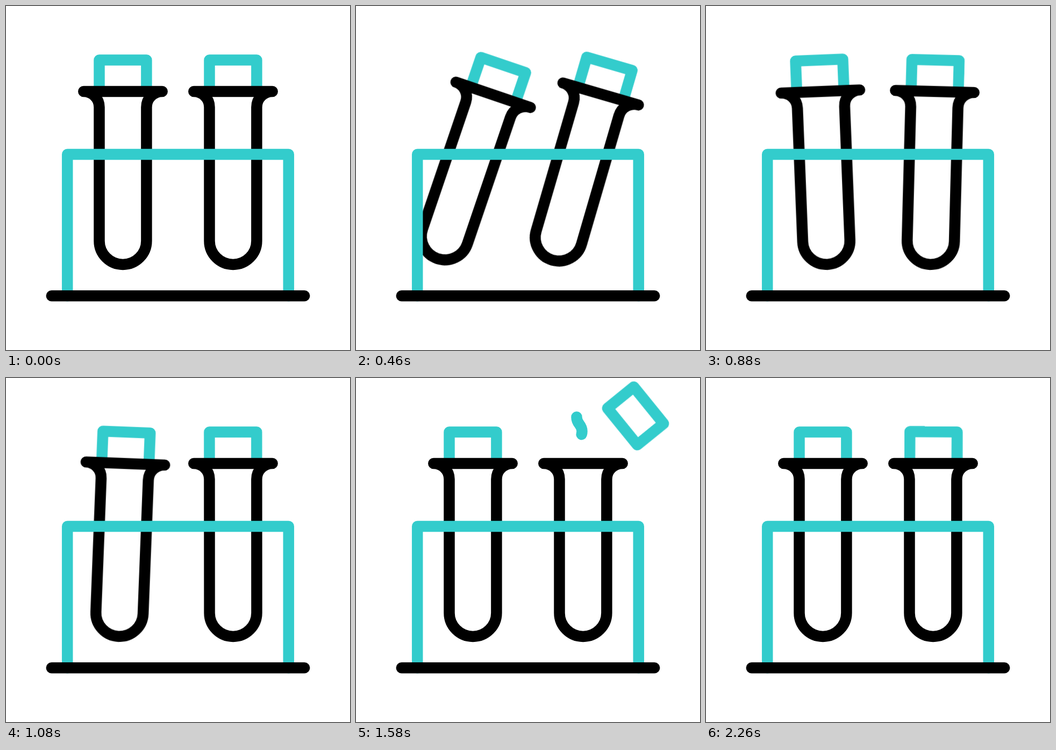
An HTML page for the animation above (2400 ms loop, 640x640 px).

```html
<!DOCTYPE html>
<html lang="en">
<head>
<meta charset="utf-8">
<title>Test tubes</title>
<style>
  html, body { margin: 0; height: 100%; overflow: hidden; background: #fff; }
  svg { display: block; width: 100vw; height: 100vh; }
  svg * { transform-box: view-box; }

  .line { fill: none; stroke-width: 20.5; stroke-linecap: round; stroke-linejoin: round; }
  .ink { stroke: #000; }
  .teal { stroke: #3cc; }

  .swing, .lid, .drop { animation: 2400ms infinite cubic-bezier(.364, 0, .636, 1); }
  .swing { transform-origin: 217.5px 276px; animation-name: swing; }
  .lead { animation-delay: -44ms; }
  .lid { transform-origin: 217.5px 131.9px; animation-name: pop; }
  .drop { animation-name: drop; animation-timing-function: linear; }

  @keyframes swing {
    0%, 1.83% { transform: rotate(0deg); }
    18.33% { transform: rotate(19.1deg); }
    31.58% { transform: rotate(-9.5deg); }
    41.67% { transform: rotate(4.6deg); }
    50% { transform: rotate(-2.1deg); }
    60%, 100% { transform: rotate(0deg); }
  }

  @keyframes pop {
    0%, 45.83% { transform: translate(0, 0) rotate(0deg); }
    65% { transform: translate(97.8px, -61.5px) rotate(51deg); }
    78.33% {
      transform: translate(84.3px, -53px) rotate(44deg);
      animation-timing-function: cubic-bezier(.35, .2, .75, .85);
    }
    94.4%, 100% { transform: translate(0, 0) rotate(0deg); }
  }

  @keyframes drop {
    0%, 53.3% { opacity: 0; stroke-dasharray: 0 300; stroke-dashoffset: 0; }
    53.34% { opacity: 1; stroke-dasharray: 0 300; stroke-dashoffset: 0; }
    55.83% { opacity: 1; stroke-dasharray: 13 300; stroke-dashoffset: 0; }
    65% { opacity: 1; stroke-dasharray: 38 300; stroke-dashoffset: -22; }
    78.33% { opacity: 1; stroke-dasharray: 38 300; stroke-dashoffset: -62; }
    85.8% { opacity: 1; stroke-dasharray: 0.1 300; stroke-dashoffset: -99.9; }
    85.84%, 100% { opacity: 0; stroke-dasharray: 0 300; stroke-dashoffset: -100; }
  }
</style>
</head>
<body>
<svg viewBox="0 0 640 640">
  <defs>
    <clipPath id="above"><rect x="-300" y="-200" width="1000" height="359"/></clipPath>
    <rect id="cap" x="173.5" y="100.4" width="87.9" height="63"/>
    <path id="tube" d="M144.3 159H290.7M144.3 159c16.2 0 29.2 13 29.2 29.3V437a43.95 43.95 0 0 0 87.9 0V188.3c0-16.2 13-29.3 29.3-29.3"/>
  </defs>

  <g class="swing">
    <g clip-path="url(#above)"><use href="#cap" class="line teal"/></g>
    <use href="#tube" class="line ink"/>
  </g>

  <path class="line teal drop" pathLength="100" d="M410.5 125c0-13 10-13 10-26s-10-13-10-26c0-17 10-16 10-32.5"/>

  <g transform="translate(205)">
    <g class="swing lead">
      <g clip-path="url(#above)"><g class="lid"><use href="#cap" class="line teal"/></g></g>
      <use href="#tube" class="line ink"/>
    </g>
  </g>

  <path class="line teal" d="M114.2 539.3V276H525.8V539.3"/>
  <path class="line ink" d="M84.8 539.3H555.2"/>
</svg>
</body>
</html>
```
